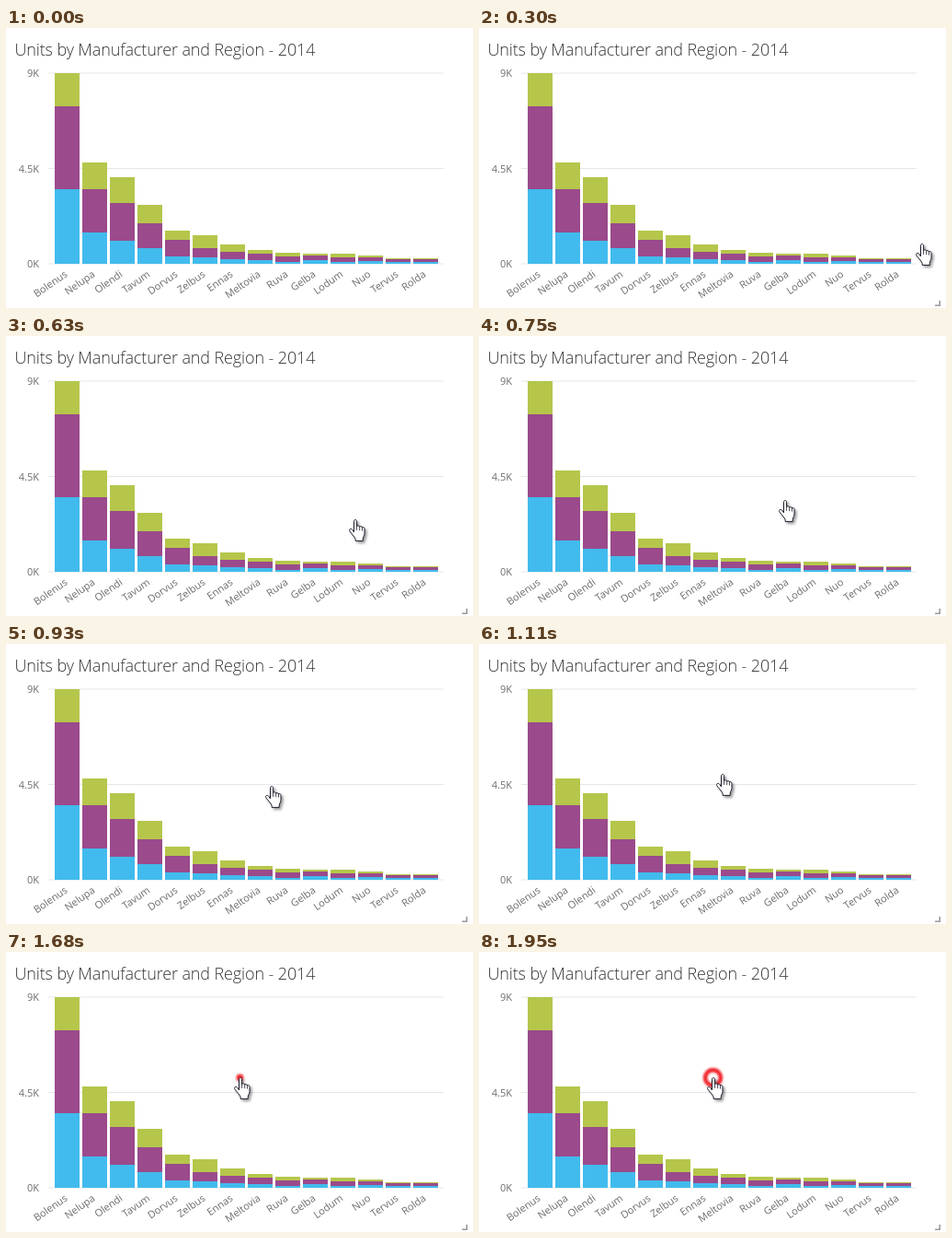
An HTML page for the animation above (1.98 s loop, 508 by 304 pixels).

```html
<!DOCTYPE html>
<html lang="en">
<head>
<meta charset="utf-8">
<title>Units by Manufacturer and Region</title>
<style>
  html, body { margin: 0; width: 100%; height: 100%; overflow: hidden; background: #fff; }
  svg { display: block; width: 508px; height: 304px; }
  text { font-family: "Open Sans", "Noto Sans", sans-serif; font-size: 11px; fill: #6b6b6b; }
  .title { font-size: 18px; font-weight: 300; letter-spacing: -.12px; fill: #333; }
  .end { text-anchor: end; }
  #hand { filter: drop-shadow(2.5px 2.5px 1.4px rgba(0, 0, 0, .42)); }
</style>
</head>
<body>
<svg viewBox="0 0 508 304">
  <defs>
    <filter id="soft" x="-100%" y="-100%" width="300%" height="300%">
      <feGaussianBlur stdDeviation="1.2"/>
    </filter>
  </defs>
  <text class="title" x="9.4" y="30">Units by Manufacturer and Region - 2014</text>
  <g id="chart"></g>
  <path id="corner" d="M501.2 296V301.2H496" fill="none" stroke="#999" stroke-width="1.6"/>
  <circle id="ring" cx="254.5" cy="136.5" fill="none" stroke="#f0282f" filter="url(#soft)"/>
  <g id="hand" stroke="#1b1b2b" stroke-linejoin="round" stroke-linecap="round">
    <path fill="#fff" d="M5.5 13.5V2.2C5.5 0 8.6 0 8.6 2.2V7.6C9.2 6.4 11.5 6.6 11.7 8.2
      C12.3 7.2 14.3 7.5 14.5 9C15.2 8.2 17 8.7 17 10.4V15.5C17 18 15.2 19.2 15.2 21.5V23.4H7.2V21.5
      C6.6 19.5 3.6 16.6 1 13.1C-.4 10.8 1.8 9.3 3.4 11Z"/>
    <path fill="none" stroke-width=".8" d="M8.6 7.6V11.5M11.7 8.2V11.8M14.5 9V12.2"/>
  </g>
</svg>
<script>
const LOOP = 1980, STEP = 30, BASE = 256;
const COLORS = ["#b5c64b", "#9b4a8b", "#41bbed"];

// Label, then the top edge of the green, purple and blue parts
const BARS = [
  ["Bolenus", 49, 85, 175], ["Nelupa", 146, 175, 222], ["Olendi", 162, 190, 231],
  ["Tavum", 192, 212, 239], ["Dorvus", 220, 230, 248], ["Zelbus", 225, 239, 249],
  ["Ennas", 235, 243, 251], ["Meltovia", 241, 245, 252], ["Ruva", 244, 248, 254],
  ["Gelba", 245, 247, 252], ["Lodum", 245, 249, 254], ["Nuo", 247, 249, 253],
  ["Tervus", 250, 251, 254], ["Rolda", 250, 251, 254]
];

// Pointer path: time, left, top
const PATH = [
  [60, 506, 244], [180, 497, 241], [300, 475, 234], [420, 440, 222], [510, 413, 213],
  [570, 397, 209], [660, 361, 194], [750, 326, 178], [780, 326, 178], [900, 287, 157],
  [1020, 265, 145], [1110, 258, 141], [1140, 258, 141], [1260, 251, 138], [1350, 248, 136]
];

const $ = id => document.getElementById(id);
const chart = $("chart"), hand = $("hand"), corner = $("corner"), ring = $("ring");

function add(tag, attrs, content = "") {
  const el = document.createElementNS("http://www.w3.org/2000/svg", tag);
  for (const key in attrs) el.setAttribute(key, attrs[key]);
  el.textContent = content;
  chart.append(el);
}

function drawChart() {
  ["9K", "4.5K", "0K"].forEach((label, i) => {
    const y = 49 + 103.5 * i;
    add("path", { d: `M46 ${y}H476`, stroke: "#e6e6e6" });
    add("text", { x: 36, y: y + 4, class: "end" }, label);
  });
  BARS.forEach(([label, ...tops], i) => {
    const x = 53 + 30 * i;
    tops.forEach((y, k) => {
      const height = (tops[k + 1] ?? BASE) - y;
      add("rect", { x, y, width: 27, height, fill: COLORS[k] });
    });
    add("text", { class: "end", transform: `translate(${x + 14.5} 269) rotate(-35)` }, label);
  });
}

function pointerAt(t) {
  const next = PATH.findIndex(p => p[0] > t);
  if (next < 0) return PATH.at(-1).slice(1);
  const a = PATH[next - 1], b = PATH[next];
  const k = (t - a[0]) / (b[0] - a[0]);
  return [1, 2].map(i => Math.round(a[i] + (b[i] - a[i]) * k));
}

function show(el, on) {
  el.style.visibility = on ? "visible" : "hidden";
}

function render() {
  const t = Math.floor(performance.now() % LOOP / STEP) * STEP;
  const active = t >= 60, pulsing = t >= 1680;
  show(corner, active);
  show(hand, active);
  show(ring, pulsing);
  if (active) hand.setAttribute("transform", `translate(${pointerAt(t)})`);
  if (pulsing) {
    const k = (t - 1680) / 270;
    ring.setAttribute("r", 2 + 6.4 * k);
    ring.setAttribute("stroke-width", 4 + .6 * k);
  }
  requestAnimationFrame(render);
}

drawChart();
render();
</script>
</body>
</html>
```
